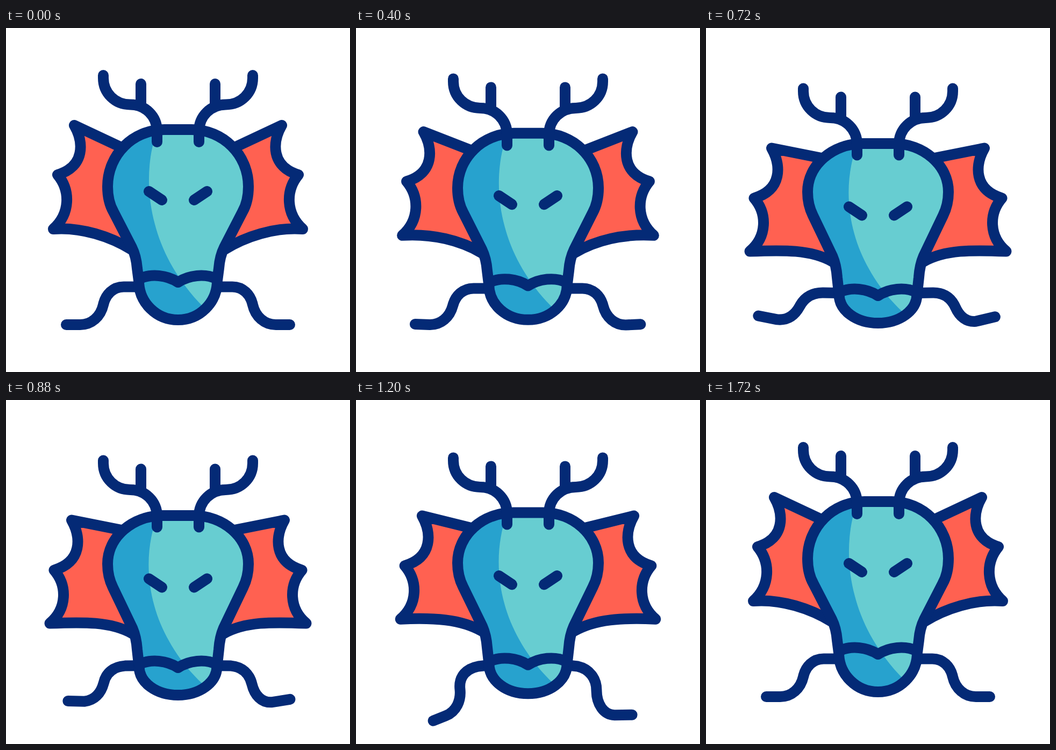
Write an HTML page that moves like this. It is 640 px wide and 640 px high and loops after 1800 ms.

```html
<!DOCTYPE html>
<html lang="en">
<head>
<meta charset="utf-8">
<title>Dragon head</title>
<style>
  html, body { margin: 0; width: 100%; height: 100%; overflow: hidden; background: #fff; }
  svg { display: block; width: 100vw; height: 100vh; }
  .line { fill: none; stroke: #042a76; stroke-width: 20; stroke-linecap: round; stroke-linejoin: round; }
  #wings { fill: #ff6151; }
  #skin { fill: #67cdd1; }
  #shade { fill: #27a2ce; }
</style>
</head>
<body>
<svg viewBox="0 0 640 640">
  <clipPath id="face"><path id="mask"/></clipPath>
  <path id="wings" class="line"/>
  <path id="whiskers" class="line"/>
  <path id="skin"/>
  <g clip-path="url(#face)"><path id="shade"/></g>
  <path id="head" class="line"/>
  <path id="mouth" class="line"/>
  <path id="eyes" class="line"/>
  <path id="antlers" class="line"/>
</svg>
<script>
const LOOP = 1800;
const $ = id => document.getElementById(id);
const NUM = /-?\d+(\.\d+)?/g;

// Left halves; each pair is the raised and the lowered pose.
const HEAD = [
  'M320 189 L295 189 C236 189 189 236 189 295 C189 313 192 328 200 342 L234 408 C241 422 243 434 244 447 L247 470 C247 511 280 543 320 543',
  'M320 215 L292 215 C235 215 189 255 189 305 C189 322 193 337 199 349 L235 424 C241 438 243 449 244 464 L247.5 496 C248 526 280 549 320 549'
];
const WING = [
  'M225 227 L127 181 C145 212 147 258 96 273 C120 302 120 345 88 374 C140 370 195 388 235 413',
  'M225 244 L122 223.5 C140 255 142 301 89.5 316.5 C114 345 114 388 81.5 415.5 C145 413 195 412 235 434.5'
];
const SHADE = [
  'M100 189 L282 189 C261 245 262 310 277 365 C290 415 318 470 370 522 L370 570 L100 570',
  'M100 215 L282 215 C261 268 261 330 276 383 C290 435 325 492 370 532 L370 570 L100 570'
];
// Whisker poses relative to the head: rest, swung up, swung down.
const REST = 'M246 481.5 L219 481.5 C199 481.5 185 496 181 515 C176 537 159 552 138 552 L112 552';
const LEFT = [
  REST,
  'M246 482 L217 481.5 C197 481.5 183 490 174 507 C164 525 150 533 132 531 L97 524',
  'M246 485 L228 487 C207 491 191 505 194 530 C196.5 551 188 571.5 168 580 L145 589.5'
];
const RIGHT = [
  REST,
  'M246 482 L217 481.5 C197 481.5 184 491 176 508 C168 526 155 536 138 534.5 L102 526',
  'M246 485 L228 487 C207 492 192.5 509 193 533 C193 558 180 578 160 578.5 L127 578'
];

const ease = p => p * p * (3 - 2 * p);
const ramp = (t, from, to) => ease(Math.min(1, Math.max(0, (t - from) / (to - from))));

// Apply fn(value, index) to every number in a path.
const mapNums = (d, fn) => {
  let i = 0;
  return d.replace(NUM, n => fn(+n, i++).toFixed(2));
};
const mix = (a, b, k) => {
  const end = b.match(NUM);
  return mapNums(a, (n, i) => n + (end[i] - n) * k);
};
const flip = d => mapNums(d, (n, i) => i % 2 ? n : 640 - n);
const both = d => d + flip(d);
const setPath = (id, d) => $(id).setAttribute('d', d);
const shift = (id, y) => $(id).setAttribute('transform', `translate(0 ${y.toFixed(2)})`);

function whisker([rest, up, down], t) {
  if (t < 700) return mix(rest, up, ramp(t, 310, 700));
  if (t < 1130) return mix(up, down, ramp(t, 700, 1130));
  return mix(down, rest, ramp(t, 1130, 1720));
}

function draw(t) {
  const u = ramp(t, 240, 720) - ramp(t, 1060, 1540);
  const bend = u * (1 - u);
  const w = u + 0.12 * bend;

  // The chin lags behind the brow.
  const last = HEAD[0].match(NUM).length - 1;
  const half = mapNums(mix(...HEAD, u), (n, i) => i === last || i === last - 2 ? n - 9 * bend : n);
  const head = both(half);
  for (const id of ['mask', 'skin', 'head']) setPath(id, head);

  setPath('shade', mix(...SHADE, u));
  setPath('wings', both(mix(...WING, w)));
  setPath('whiskers', whisker(LEFT, t) + flip(whisker(RIGHT, t)));
  shift('whiskers', 11 * u);
  shift('mouth', 25 * u);
  shift('antlers', 24.5 * u);
  shift('eyes', 28.5 * w);
}

setPath('mouth', both('M248 467 C270 456 300 460 320 473'));
setPath('eyes', both('M266 304 L290 320'));
setPath('antlers', both('M181 88 L181 93 C181 121 203 142.5 231 142.5 C259 142.5 281 164 281 192 L281 212 M251 104 L251 141'));

const start = performance.now();
function tick() {
  draw((performance.now() - start) % LOOP);
  requestAnimationFrame(tick);
}
tick();
</script>
</body>
</html>
```
